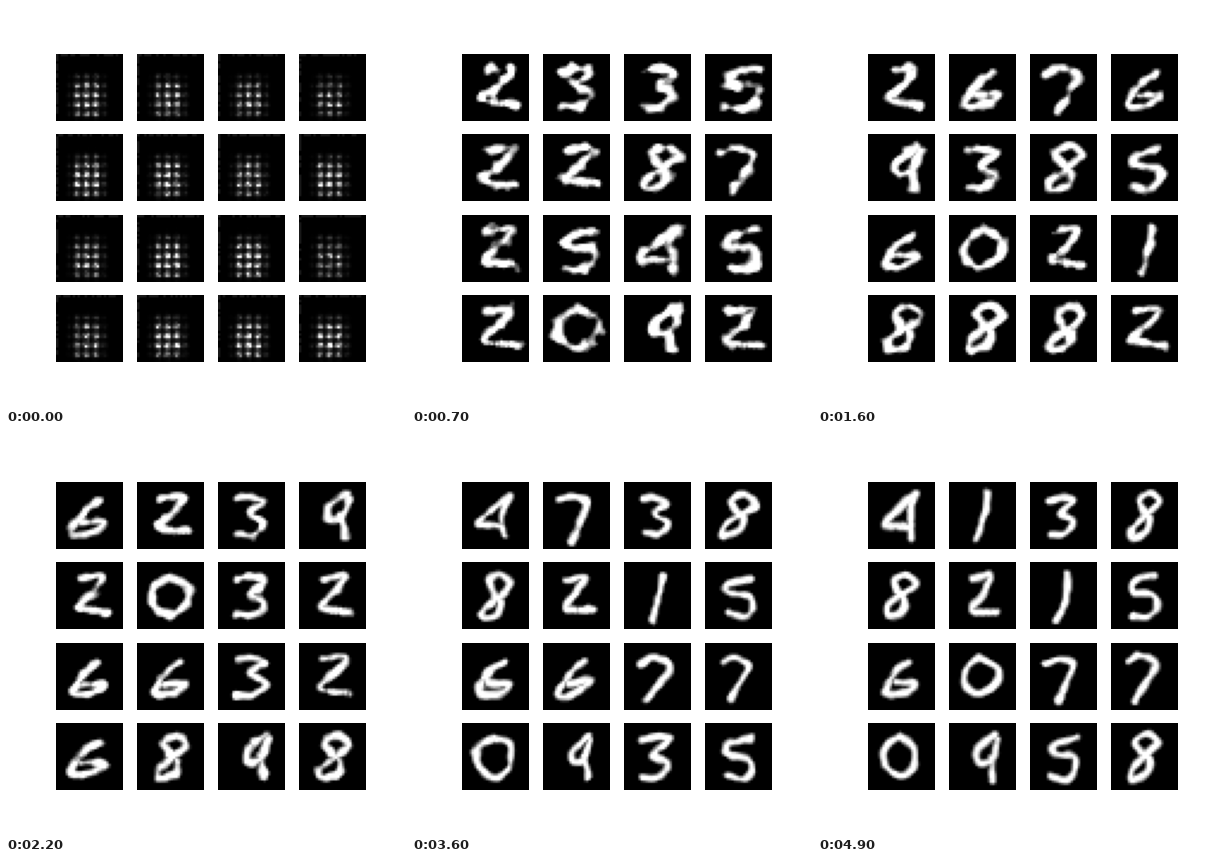
Animation, 400 px wide and 400 px high, one loop 5000 ms. Source, as a matplotlib script:

```python
import numpy as np
import matplotlib.pyplot as plt
from matplotlib.animation import FuncAnimation

FRAMES, INTERVAL, SIZE, CELLS = 50, 100, 28, 16
ys, xs = np.mgrid[0:SIZE, 0:SIZE]

# Key points of each handwritten digit as strokes x, y, x, y, ...
DIGITS = {
    "0": [(13, 6, 7, 11, 7, 18, 13, 22, 19, 18, 20, 10, 13, 6)],
    "1": [(16, 5, 15, 13, 14, 19, 12, 24)],
    "2": [(10, 7, 18, 6, 15, 12, 9, 19, 20, 21)],
    "3": [(8, 7, 13, 6, 18, 8, 13, 13, 18, 17, 14, 22, 8, 22)],
    "4": [(20, 5, 17, 12, 18, 23), (20, 5, 12, 12, 7, 18, 16, 19)],
    "5": [(19, 6, 10, 9, 10, 13, 18, 14, 19, 19, 15, 23, 9, 22)],
    "6": [(17, 8, 12, 12, 7, 21, 14, 21, 19, 17, 11, 17)],
    "7": [(7, 8, 12, 6, 18, 9, 16, 15, 11, 24)],
    "8": [(14, 14, 11, 8, 16, 5, 20, 9, 15, 14, 9, 19, 9, 23, 15, 21, 16, 16, 13, 13)],
    "9": [(19, 5, 12, 11, 12, 16, 17, 15, 20, 7), (17, 14, 18, 23)],
}

# The digit each cell resembles as training goes on
STAGES = {7: "2335 2287 2545 2092", 16: "2676 9385 6021 8882", 22: "6239 2032 6632 6898",
          30: "4778 3215 3677 0935", 43: "4138 8215 6077 0958"}
STAGES = {step: labels.replace(" ", "") for step, labels in STAGES.items()}


def curve(stroke):
    """Catmull-Rom spline through the stroke's points."""
    p = np.reshape(stroke, (-1, 2)).astype(float)
    p = np.vstack([2 * p[0] - p[1], p, 2 * p[-1] - p[-2]])
    t = np.linspace(0, 1, 9)[:, None]
    return np.vstack([
        b + 0.5 * t * (c - a + t * (2 * a - 5 * b + 4 * c - d + t * (3 * (b - c) + d - a)))
        for a, b, c, d in zip(p, p[1:], p[2:], p[3:])])


paths = {digit: np.vstack([curve(s) for s in strokes]) for digit, strokes in DIGITS.items()}


def soft_noise(rng):
    """Smooth random field with unit spread."""
    field = rng.normal(size=(SIZE, SIZE))
    for _ in range(3):
        for axis in (0, 1):
            field = (np.roll(field, 1, axis) + 2 * field + np.roll(field, -1, axis)) / 4
    return field / field.std()


def stage_at(frame, index):
    """Each cell moves on to the next stage at its own moment."""
    steps = sorted(STAGES)
    current = steps[0]
    for before, after in zip(steps, steps[1:]):
        share = np.random.default_rng(100 * after + index).uniform(0.35, 0.65)
        if frame >= before + share * (after - before):
            current = after
    return current


def draw(frame, index):
    """A warped digit whose strokes get thinner and steadier with training."""
    rng = np.random.default_rng(1000 * frame + index)
    step = stage_at(frame, index)
    youth = (1 - frame / FRAMES) ** 2
    sway = 0.2 + min(abs(frame - step), 5) * (0.06 + 0.2 * youth)
    phase = rng.uniform(0, 2 * np.pi, 4)
    stretch = 1 + 0.3 * youth
    u = 14 + (xs - 13.5 - 2 * youth) / stretch
    u = u + sway * (np.sin(ys / 4 + phase[0]) + np.sin(xs / 5 + phase[1]))
    v = ys + 0.5 + sway * (np.sin(xs / 4 + phase[2]) + np.sin(ys / 5 + phase[3]))
    points = paths[STAGES[step][index]]
    dist = np.hypot(u[..., None] - points[:, 0], v[..., None] - points[:, 1]).min(axis=-1)
    edge = 2.15 + (0.2 + 0.5 * youth) * soft_noise(rng)
    return np.clip((edge - dist) / 1.4, 0, 1)


def lattice(index):
    """The untrained checker artefact: dots on a four-pixel grid."""
    rng = np.random.default_rng(index)
    envelope = np.exp(-((xs - 12.7) / 6.3) ** 4 - ((ys - 17) / 8) ** 4) * (0.3 + ys / 22)
    dots = np.outer(np.take([0.7, 1, 0.2, 0.2], np.arange(SIZE) % 4),
                    np.take([1, 0.8, 0.15, 0.35], np.arange(SIZE) % 4))
    gain = rng.uniform(0.7, 1.3)
    image = gain * envelope * dots * rng.uniform(0.4, 1.4, xs.shape)
    border = (xs + ys < 26) & (xs * ys == 0) & (rng.random(xs.shape) < 0.6)
    return np.clip(image + 0.1 * border, 0, 1)


def cell_image(frame, index):
    fade = max(0, 1 - frame / 4)
    if fade == 0:
        return draw(frame, index)
    return np.clip((1 - fade) * draw(frame, index) + fade * lattice(index), 0, 1)


fig, axes = plt.subplots(4, 4, figsize=(4, 4), dpi=100)
images = []
for ax in axes.flat:
    ax.axis("off")
    images.append(ax.imshow(np.zeros((SIZE, SIZE)), cmap="gray", vmin=0, vmax=1))


def update(frame):
    for index, artist in enumerate(images):
        artist.set_data(cell_image(frame, index))
    return images


anim = FuncAnimation(fig, update, frames=FRAMES, interval=INTERVAL, repeat=True, repeat_delay=0)
plt.show()
```
